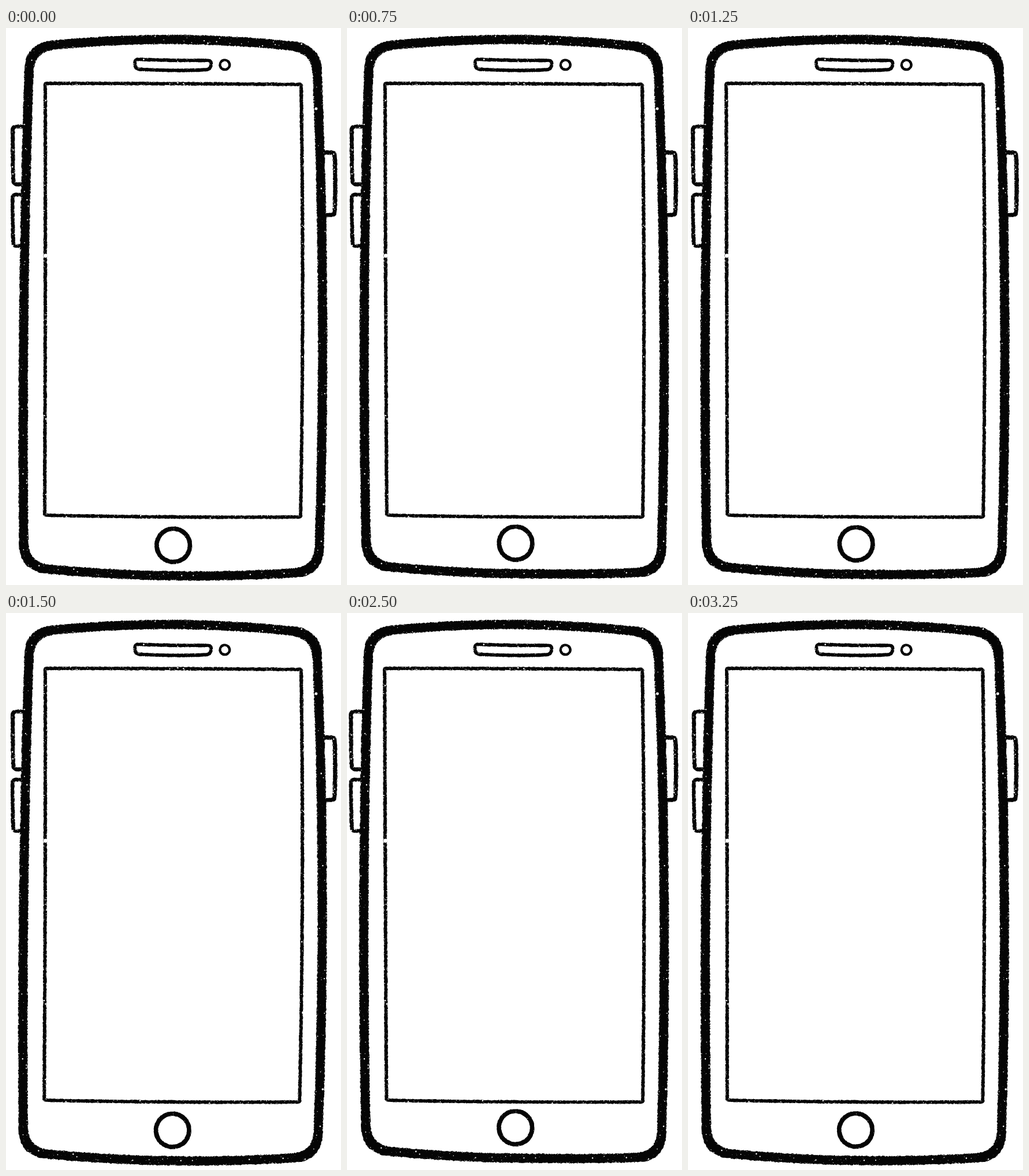
An HTML page with a canvas for the animation above (3.5 s loop, 580x966 px).

```html
<!DOCTYPE html>
<html lang="en">
<head>
<meta charset="utf-8">
<title>Sketched phone</title>
<style>
html, body { margin: 0; width: 100%; height: 100%; overflow: hidden; background: #fff; }
canvas { display: block; width: 580px; height: 966px; }
</style>
</head>
<body>
<canvas id="stage" width="580" height="966"></canvas>
<script>
const ctx = document.getElementById('stage').getContext('2d');
const INK = '#050505';
const STEP = 250;

let seed = 7;
function rand() {
  seed = (seed * 1664525 + 1013904223) % 4294967296;
  return seed / 4294967296;
}
const spread = a => (rand() * 2 - 1) * a;
const mix = (a, b, t) => a + (b - a) * t;
const clamp = v => Math.min(1, Math.max(0, v));
const average = (a, b) => a.map((v, i) => mix(v, b[i], .5));

// Sideways shift of the four corners (top left, bottom left, top right,
// bottom right), shift of the lower edge, shift of the left and right buttons
const rest = [0, 0, 0, 0, 0, 0, 0];
const dip  = [0, -.8, 0, -2, 0, 0, 0];
const ease = [-.8, 1.2, -.7, .3, -.5, -.7, -1];
const lean = [-1.5, 3, 0, 2.3, -2.7, -.8, -1];
const far  = [-3, 2, .5, 2.3, -4.6, -2, -1];

const sway = [ease, lean, average(lean, far), far, average(far, ease), dip];
const order = [rest, ...sway, rest, ...[...sway].reverse()];

function move([x, y], pose, button) {
  const [topL, lowL, topR, lowR, lift, ...push] = pose;
  const across = clamp((x - 35) / 510);
  const down = clamp((y - 50) / 850) ** 2;
  const dx = mix(mix(topL, lowL, down), mix(topR, lowR, down), across);
  const dy = lift * clamp((y - 850) / 16) * clamp((530 - x) / 190);
  return [x + dx + (push[button] || 0), y + dy];
}

// Four corners joined by bowed sides and rounded off: [x, y, swell]
function box(corners, radius, bows) {
  const pts = [];
  const sides = corners.map(([x, y], i) => {
    const [x2, y2] = corners[(i + 1) % 4];
    const len = Math.hypot(x2 - x, y2 - y);
    const at = t => {
      const bow = bows[i] * 4 * t * (1 - t) / len;
      return [mix(x, x2, t) + (y2 - y) * bow, mix(y, y2, t) - (x2 - x) * bow];
    };
    return { at, len, cut: radius / len };
  });
  sides.forEach((side, i) => {
    const next = sides[(i + 1) % 4], corner = corners[(i + 1) % 4];
    const count = Math.ceil(side.len / 2);
    for (let k = 0; k < count; k++) {
      pts.push([...side.at(mix(side.cut, 1 - side.cut, k / count)), 0]);
    }
    const a = side.at(1 - side.cut), b = next.at(next.cut);
    const turns = Math.ceil(radius * .8);
    for (let k = 0; k < turns; k++) {
      const t = k / turns;
      const curve = j => mix(mix(a[j], corner[j], t), mix(corner[j], b[j], t), t);
      pts.push([curve(0), curve(1), 4 * t * (1 - t)]);
    }
  });
  return pts;
}

function ring(cx, cy, r) {
  const n = Math.round(r * 3);
  return Array.from({ length: n }, (_, i) => {
    const a = i / n * Math.PI * 2;
    return [cx + r * Math.cos(a), cy + r * Math.sin(a), 0];
  });
}

// A closed ink line with two ragged edges and flecks of bare paper
function inkLine(line, width, { swell = 0, rough = .55, grain = 1, button } = {}) {
  const n = line.length, outer = [], inner = [], flecks = [];
  line.forEach(([x, y, s], i) => {
    const a = line[(i + n - 1) % n], b = line[(i + 1) % n];
    const len = Math.hypot(b[0] - a[0], b[1] - a[1]) || 1;
    const put = o => [x + (b[1] - a[1]) / len * o, y + (a[0] - b[0]) / len * o];
    const h = (width + swell * s) / 2;
    outer.push(put(h + spread(rough)));
    inner.push(put(-h + spread(rough)));
    if (rand() < grain * (.12 + width * .012)) {
      flecks.push([...put(spread(h)), .25 + 1.1 * rand() ** 4]);
    }
    if (rand() < grain * .4) {
      const edge = rand() < .5 ? -1 : 1;
      flecks.push([...put(edge * (h - rand() * 1.6)), .3 + rand() * .4]);
    }
  });
  return { outer, inner, flecks, button };
}

const shapes = [
  // side buttons, tucked under the case
  inkLine(box([[12, 171], [35, 171], [36, 271], [13, 271]], 6, [0, 0, 0, .7]), 7, { button: 0 }),
  inkLine(box([[11.5, 289], [34, 289], [33, 378], [13, 378]], 6, [0, 0, 0, .7]), 6.5, { button: 0 }),
  inkLine(box([[546, 216], [569, 216], [569, 324], [546, 325]], 6, [0, 1, 0, 0]), 7.5, { button: 1 }),
  // case
  inkLine(box([[41, 34], [537, 36], [541, 942], [31, 934]], 41, [15, 9, 12, 5]), 16,
    { swell: 2, rough: .8 }),
  // screen
  inkLine(box([[68, 96], [511, 98], [510, 848], [67, 845]], 2, [.5, 3, 1.5, -.5]), 6),
  // speaker, camera, home key
  inkLine(box([[222.5, 54], [356, 56], [353.5, 72], [224, 71]], 7, [-1, 0, 2, 0]), 6,
    { rough: .4, grain: .5 }),
  inkLine(ring(378.8, 63.8, 8.3), 4.4, { rough: .25, grain: .2 }),
  inkLine(ring(289.7, 897.2, 28.8), 7.8, { rough: .4, grain: .3 })
];

// The larger bare spots
const spots = [[68.5, 395, 3.4], [537, 140, 2.4], [515.5, 693, 2.2], [550, 826, 1.8]];

function trace(pts, pose, button) {
  pts.forEach((p, i) => {
    const [x, y] = move(p, pose, button);
    i ? ctx.lineTo(x, y) : ctx.moveTo(x, y);
  });
  ctx.closePath();
}

function dots(list, pose, button) {
  ctx.fillStyle = '#fff';
  ctx.beginPath();
  for (const [px, py, r] of list) {
    const [x, y] = move([px, py], pose, button);
    ctx.moveTo(x + r, y);
    ctx.arc(x, y, r, 0, Math.PI * 2);
  }
  ctx.fill();
}

function draw(pose) {
  ctx.fillStyle = '#fff';
  ctx.fillRect(0, 0, 580, 966);
  for (const { outer, inner, flecks, button } of shapes) {
    ctx.fillStyle = INK;
    ctx.beginPath();
    trace(outer, pose, button);
    trace(inner, pose, button);
    ctx.fill('evenodd');
    dots(flecks, pose, button);
  }
  dots(spots, pose);
}

const start = performance.now();
let shown = -1;
function tick() {
  const time = Math.max(0, performance.now() - start);
  const step = Math.floor(time / STEP) % order.length;
  if (step !== shown) {
    draw(order[step]);
    shown = step;
  }
  requestAnimationFrame(tick);
}
tick();
</script>
</body>
</html>
```
